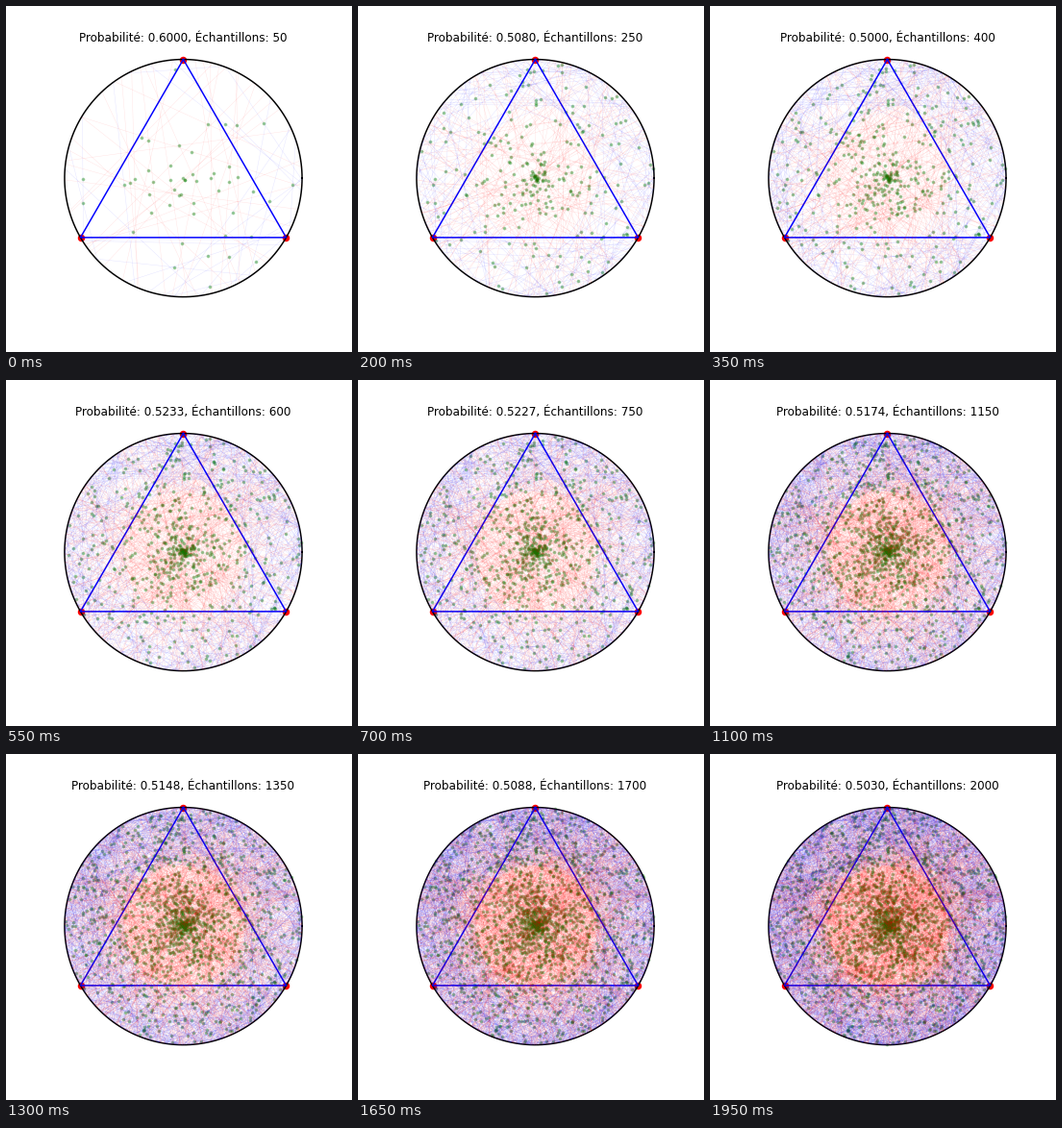
These frames come from a looping animation (360 px wide and 360 px high, 2000 ms). A matplotlib script:

```python
import numpy as np
import matplotlib.pyplot as plt
from matplotlib.animation import FuncAnimation
from matplotlib.collections import LineCollection

STEPS, BATCH = 40, 50
TAU = 2 * np.pi

# Running count of chords longer than the triangle's side
totals = np.arange(1, STEPS + 1) * BATCH
hits = np.rint(np.interp(totals,
                         [50, 400, 600, 950, 1350, 1700, 2000],
                         [30, 200, 314, 495, 695, 865, 1006])).astype(int)

rng = np.random.default_rng(7)


def radii(long):
    """Midpoint distances of one batch; `long` of them lie below 1/2."""
    r = rng.uniform(0, 0.5, BATCH)
    r[long:] += 0.5
    return rng.permutation(r)


def on_circle(a):
    return np.stack([np.cos(a), np.sin(a)], axis=-1)


r = np.concatenate([radii(n) for n in np.diff(hits, prepend=0)])
a = rng.uniform(0, TAU, r.size)
half = np.arccos(r)
chords = np.stack([on_circle(a - half), on_circle(a + half)], axis=1)
mids = chords.mean(axis=1)

fig = plt.figure(figsize=(5, 5), dpi=72, facecolor="white")
ax = fig.add_axes([0.125, 0.125, 0.775, 0.755])
ax.set(xlim=(-1.1, 1.1), ylim=(-1.1, 1.1), aspect="equal")
ax.axis("off")
title = ax.set_title("", fontsize=12)

# Dots lie below every line, chords above the triangle
corners = on_circle(TAU / 4 + np.arange(4) * TAU / 3)
ax.scatter(*corners[:3].T, s=36, color="r", linewidths=1.5, zorder=1)
dots = ax.scatter([], [], s=5, color="g", alpha=0.3, linewidths=1.5, zorder=1)
ax.plot(*on_circle(np.linspace(0, TAU, 200)).T, "k", lw=1.5)
ax.plot(*corners.T, "b", lw=1.5)
lines = LineCollection([], colors=np.where(r < 0.5, "r", "b"),
                       linewidths=0.5, alpha=0.1, zorder=2)
ax.add_collection(lines, autolim=False)


def update(step):
    n = totals[step]
    lines.set_segments(chords[:n])
    dots.set_offsets(mids[:n])
    title.set_text(f"Probabilité: {hits[step] / n:.4f}, Échantillons: {n}")
    return lines, dots, title


anim = FuncAnimation(fig, update, frames=STEPS, interval=50,
                     repeat=True, repeat_delay=0, blit=False)
plt.show()
```
